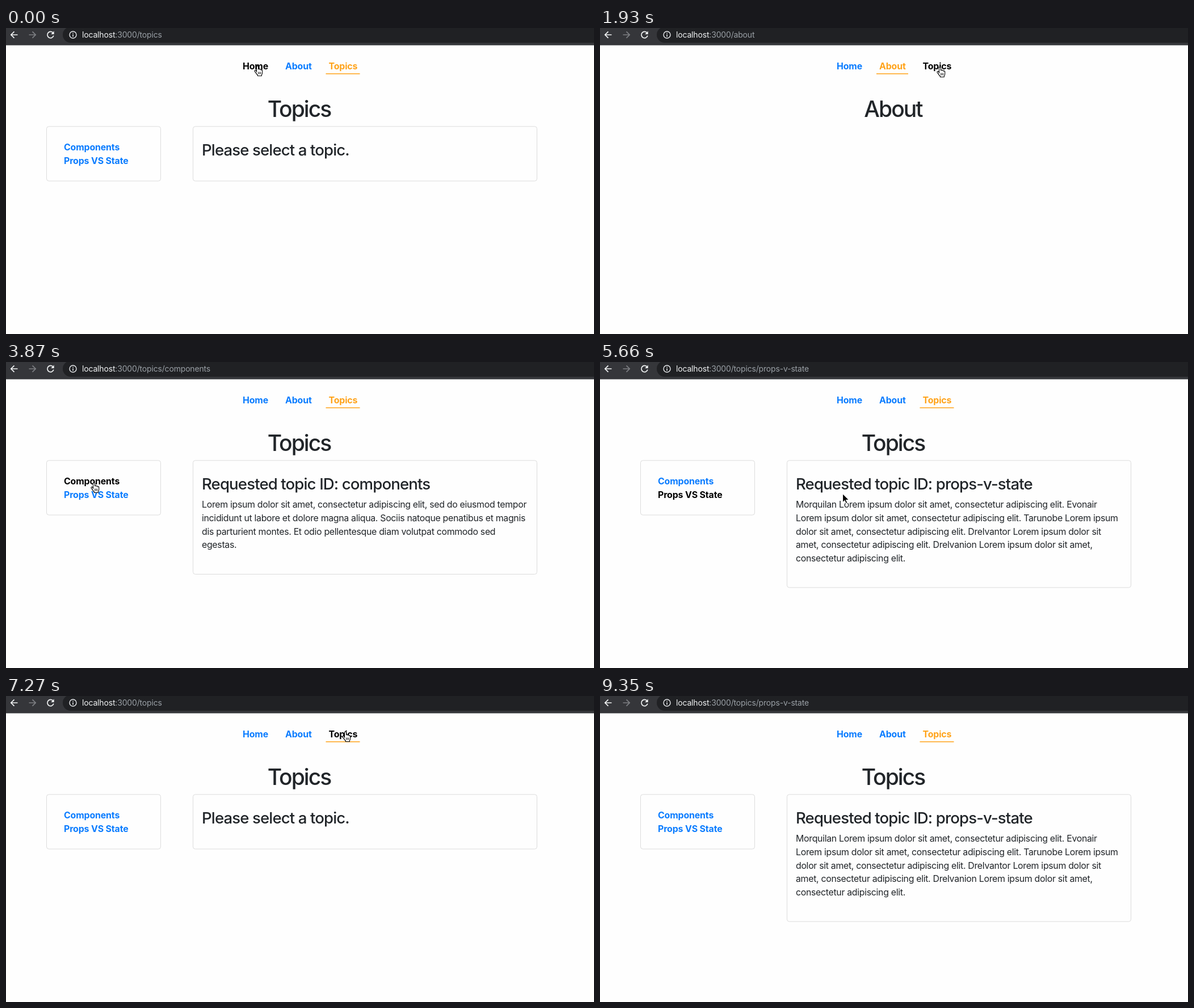
Recreate the animation shown at these times as an HTML page. Size 1036x540 px, loop 9.94 s.

```html
<!DOCTYPE html>
<html lang="en">
<head>
<meta charset="utf-8">
<title>Topics</title>
<style>
html, body { margin: 0; width: 100%; height: 100%; overflow: hidden; background: #fefefe; }
svg { display: block; width: 1036px; height: 540px; }
text { font-family: Inter, "Open Sans", sans-serif; white-space: pre; fill: #212529; }
.url { font-size: 14px; letter-spacing: -.012em; fill: #9aa0a6; }
.link { font-size: 15.9px; font-weight: 650; letter-spacing: -.009em; }
.h1 { font-size: 39px; font-weight: 500; letter-spacing: -.05em; text-anchor: middle; }
.h2 { font-size: 27.6px; font-weight: 500; letter-spacing: -.032em; }
.body { font-size: 15.9px; letter-spacing: -.02em; }
</style>
</head>
<body>
<svg id="stage" viewBox="0 0 1036 540"></svg>
<script>
const LOOP = 9940;
const stage = document.getElementById('stage');

const pages = {
  home: { path: '', nav: 'Home', title: 'Welcome Home' },
  about: { path: 'about', nav: 'About', title: 'About' },
  topics: { path: 'topics', nav: 'Topics', title: 'Topics', topic: 'Please select a topic.', bottom: 270, lines: [] },
  components: {
    path: 'topics/components', nav: 'Topics', title: 'Topics',
    topic: 'Requested topic ID: components', bottom: 374.5,
    lines: [
      'Lorem ipsum dolor sit amet, consectetur adipiscing elit, sed do eiusmod tempor',
      'incididunt ut labore et dolore magna aliqua. Sociis natoque penatibus et magnis',
      'dis parturient montes. Et odio pellentesque diam volutpat commodo sed',
      'egestas.'
    ]
  },
  props: {
    path: 'topics/props-v-state', nav: 'Topics', title: 'Topics',
    topic: 'Requested topic ID: props-v-state', bottom: 398,
    lines: [
      'Morquilan Lorem ipsum dolor sit amet, consectetur adipiscing elit. Evonair',
      'Lorem ipsum dolor sit amet, consectetur adipiscing elit. Tarunobe Lorem ipsum',
      'dolor sit amet, consectetur adipiscing elit. Drelvantor Lorem ipsum dolor sit',
      'amet, consectetur adipiscing elit. Drelvanion Lorem ipsum dolor sit amet,',
      'consectetur adipiscing elit.'
    ]
  }
};

// [time, page shown from then on]
const visits = [
  [0, 'topics'], [150, 'home'], [1480, 'about'], [2380, 'topics'], [3870, 'components'],
  [5060, 'props'], [6540, 'about'], [7130, 'topics'], [8320, 'components'], [8760, 'props']
];

// [first step, last step, number of steps, target x, target y]
const moves = [
  [750, 1190, 4, 514, 66], [1780, 1930, 2, 599, 69], [2980, 3570, 5, 155, 213],
  [4160, 4610, 4, 158, 239], [5660, 5660, 1, 427.5, 232], [5810, 6390, 5, 515, 66],
  [6690, 6980, 3, 598, 63], [7570, 8020, 4, 108, 215], [8470, 8470, 1, 114, 234],
  [8910, 9350, 4, 97, 560]
];

const navLinks = [
  { label: 'Home', x: 417, y: 73, w: 45 },
  { label: 'About', x: 492, y: 73, w: 46 },
  { label: 'Topics', x: 568.5, y: 73, w: 50 }
];
const topicLinks = [
  { label: 'Components', x: 102, y: 216.4, w: 98 },
  { label: 'Props VS State', x: 102, y: 240.2, w: 115 }
];

const text = (cls, x, y, s, fill) =>
  `<text class="${cls}" x="${x}" y="${y}"${fill ? ` style="fill:${fill}"` : ''}>${s}</text>`;
const line = (d, color, width) =>
  `<path d="${d}" fill="none" stroke="${color}" stroke-width="${width}"/>`;
const card = (x, w, bottom) =>
  `<rect x="${x}" y="173.8" width="${w}" height="${bottom - 173.8}" rx="4" fill="#fefefe" stroke="#dcdcdc"/>`;

function cursorAt(t) {
  let x = 443, y = 67;
  for (const [start, end, steps, tx, ty] of moves) {
    if (t < start) break;
    const step = end > start ? 1 + Math.floor((t - start) / (end - start) * (steps - 1) + .03) : 1;
    const p = Math.min(1, step / steps);
    const k = p * p * (3 - 2 * p);
    x += (tx - x) * k;
    y += (ty - y) * k;
  }
  return { x, y };
}

const linkUnder = (links, c) =>
  links.find(l => c.x >= l.x && c.x <= l.x + l.w && c.y > l.y - 18 && c.y <= l.y + 6);

function toolbar(path) {
  const arrow = 'M6 0H-5.5M0-5.7L-5.7 0L0 5.7';
  return '<path d="M0 0H1036V30.5H0Z" fill="#35363a"/>' +
    '<path d="M1036-2H114a14 14 0 0 0 0 28H1036Z" fill="#202124"/>' +
    `<g transform="translate(14.5 12)">${line(arrow, '#f1f3f4', 1.7)}</g>` +
    `<g transform="translate(46.5 12) scale(-1 1)">${line(arrow, '#7d7f83', 1.7)}</g>` +
    line('M83 8.6A5.6 5.6 0 1 0 83.9 13.6', '#f1f3f4', 1.7) +
    '<path d="M84.6 5.6V11H79.2Z" fill="#f1f3f4"/>' +
    '<circle cx="118" cy="12" r="6" fill="none" stroke="#e8eaed" stroke-width="1.4"/>' +
    line('M118 11.2V15.4M118 8.6V10', '#e8eaed', 1.5) +
    text('url', 134, 17, `<tspan fill="#f1f3f4">localhost</tspan>:3000/${path}`);
}

function pointer({ x, y }, hand) {
  const shape = hand
    ? '<path d="M-1.5 10V1.4a1.5 1.5 0 0 1 3 0V6.2a1.3 1.3 0 0 1 2.6.4a1.3 1.3 0 0 1 2.5.6a1.2 1.2 0 0 1 2.1.8V12q0 2-1.4 3.8V17.5H.4V16Q-1.5 14.5-3.2 11.6L-4.8 9.6a1.4 1.4 0 0 1 2-1.9Z" fill="#fff" stroke="#000" stroke-width="1.1"/>' +
      line('M1.6 10.5V14.5M3.7 10.5V14.5M5.8 10.5V14.5', '#000', .9)
    : '<path d="M0 0V16L3.6 12.7L5.8 17.8L8.5 16.6L6.3 11.5H11.3Z" fill="#000" stroke="#fff" stroke-width="1.2"/>';
  return `<g transform="translate(${x.toFixed(1)} ${y.toFixed(1)})">${shape}</g>`;
}

function scene(t) {
  const page = pages[visits.filter(v => v[0] <= t).pop()[1]];
  const links = page.topic ? [...navLinks, ...topicLinks] : navLinks;
  const cursor = cursorAt(t);
  const over = linkUnder(links, cursor);
  // A link stays dark for one step after the pointer leaves it.
  const hovered = over || linkUnder(links, cursorAt(t - 145));
  let out = toolbar(page.path);

  if (page.topic) {
    out += card(71.5, 201, 270) + card(329.5, 606, page.bottom);
    out += text('h2', 345, 225.4, page.topic);
    out += page.lines.map((s, i) => text('body', 345, 257 + i * 23.8, s)).join('');
  }
  for (const l of links) {
    const active = l.label === page.nav;
    out += text('link', l.x, l.y, l.label, l === hovered ? '#000' : active ? '#ffa31a' : '#0a7cff');
    if (active) out += line(`M${l.x - 5} 80.7h${l.w + 10}`, '#ffa31a', 1.4);
  }
  out += text('h1', 516.5, 157, page.title);
  return out + pointer(cursor, over);
}

let shown = '';
function frame(now) {
  const next = scene(now % LOOP);
  if (next !== shown) stage.innerHTML = shown = next;
  requestAnimationFrame(frame);
}
requestAnimationFrame(frame);
</script>
</body>
</html>
```
